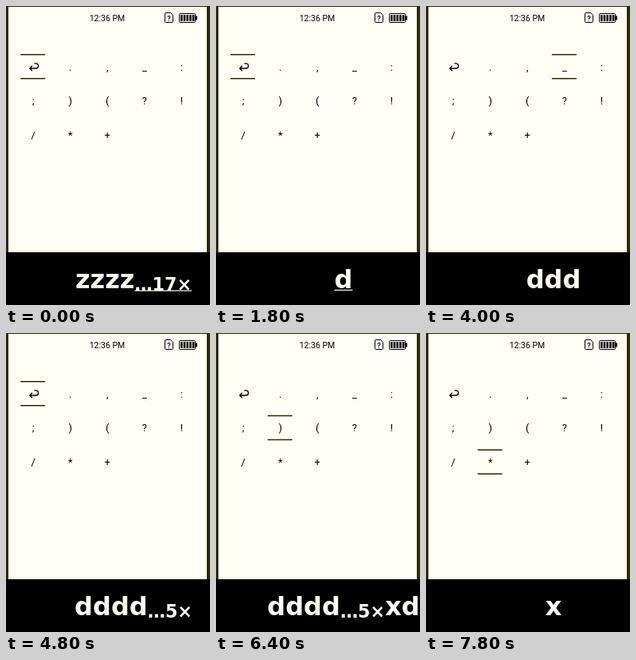
An HTML page for the animation above (8000 ms loop, 256x374 px).

```html
<!DOCTYPE html>
<html lang="en">
<head>
<meta charset="utf-8">
<title>Symbol picker</title>
<style>
  html, body { margin: 0; width: 100%; height: 100%; overflow: hidden; background: #000; }
  svg { display: block; width: 256px; height: 374px; }
  .ui { font-family: Roboto, "Noto Sans", sans-serif; fill: #000; text-anchor: middle; }
  .typed { font-family: "DejaVu Sans", sans-serif; font-weight: 700; fill: #fffff0; }
  .line { fill: none; stroke: #000; }
</style>
</head>
<body>
<svg viewBox="0 0 256 374">
  <rect width="256" height="308" fill="#2c2c00"/>
  <rect x="3" y="1" width="249" height="307" fill="#fffff6"/>
  <text class="ui" x="127" y="18.5" font-size="10.5">12:36 PM</text>

  <path class="line" d="M201 8.5H206.5L209.5 11.5V19.5Q209.5 20.5 208.5 20.5H200.5Q199.5 20.5 199.5 19.5V10Q199.5 8.5 201 8.5Z"/>
  <text class="ui" x="204.5" y="18.5" font-size="9" font-weight="500">?</text>

  <rect class="line" x="217.5" y="9.5" width="20" height="11" rx="1"/>
  <path d="M238 12.5H240V17.5H238Z"/>
  <path class="line" stroke-width="2.6" stroke-dasharray="2.6 1.1" d="M219 15H237" style="stroke-width:8"/>

  <path class="line" stroke-width="1.3" d="M35.5 71.8H37.5A3.1 3.1 0 0 1 37.5 78H30M33 74.8L29.8 78L33 81.2"/>
  <g id="keys" class="ui" font-size="13"></g>
  <path id="cursor" stroke="#2a2a00" stroke-width="1.5" d="M-16 -15H15M-16 15H15"/>
  <g id="typed" class="typed"></g>
</svg>
<script>
  const NS = 'http://www.w3.org/2000/svg';
  const $ = id => document.getElementById(id);
  const LOOP = 8000;
  const colX = c => 34.2 + c * 46.55;
  const rowY = r => 75.7 + r * 42.8;

  function add(parent, tag, attrs, text = '') {
    const el = document.createElementNS(NS, tag);
    for (const k in attrs) el.setAttribute(k, attrs[k]);
    el.textContent = text;
    parent.append(el);
    return el;
  }

  [' .,_:', ';)(?!', '/*+'].forEach((row, r) =>
    [...row].forEach((ch, c) =>
      ch !== ' ' && add($('keys'), 'text', { x: colX(c), y: rowY(r) + 4.8 }, ch)));

  // [start ms, typed pieces, last key held, cursor column, cursor row]
  const steps = [
    [0,    'zzzz …17×', 1, 0, 0],
    [200,  'zzzz …21×', 1, 0, 0],
    [400,  'zzzz …25×', 1, 0, 0],
    [600,  'zzzz …25×', 0, 0, 0],
    [1600, '',          0, 0, 0],
    [1800, 'd',         1, 0, 0],
    [2000, 'd',         0, 1, 0],
    [2600, 'd d',       1, 1, 0],
    [2800, 'd d',       0, 2, 0],
    [3400, 'dd d',      1, 2, 0],
    [3600, 'dd d',      0, 3, 0],
    [4200, 'ddd d',     1, 3, 0],
    [4400, 'ddd d',     0, 4, 0],
    [4600, 'dddd …5×',  1, 4, 0],
    [4800, 'dddd …5×',  0, 0, 0],
    [5400, 'dddd …5× x',   1, 0, 0],
    [5600, 'dddd …5× x',   0, 0, 1],
    [6200, 'dddd …5× x d', 1, 0, 1],
    [6400, 'dddd …5× x d', 0, 1, 1],
    [7400, '',          0, 1, 1],
    [7600, 'x',         1, 1, 1],
    [7800, 'x',         0, 1, 2]
  ];

  function showTyped(str, held) {
    const box = $('typed');
    box.replaceChildren();
    const parts = str.split(' ').filter(Boolean).map(s => {
      const small = s[0] === '…';
      const el = add(box, 'text', { y: small ? 355.5 : 353, 'font-size': small ? 22.2 : 32 }, s);
      return { el, small, w: el.getComputedTextLength() };
    });
    let x = 160 - parts.reduce((sum, p) => sum + p.w, 0) / 2;
    parts.forEach((p, i) => {
      p.el.setAttribute('x', x);
      if (held && i === parts.length - 1)
        add(box, 'rect', { x, y: p.small ? 355.5 : 354.8, width: p.w, height: 1.2 });
      x += p.w;
    });
  }

  let shown = null;
  function draw(now) {
    const t = now % LOOP;
    const step = steps.findLast(s => s[0] <= t);
    if (step !== shown) {
      const [, str, held, c, r] = shown = step;
      showTyped(str, held);
      $('cursor').setAttribute('transform', `translate(${colX(c)} ${rowY(r)})`);
    }
  }

  const start = performance.now();
  function tick() {
    draw(performance.now() - start);
    requestAnimationFrame(tick);
  }
  tick();
</script>
</body>
</html>
```
